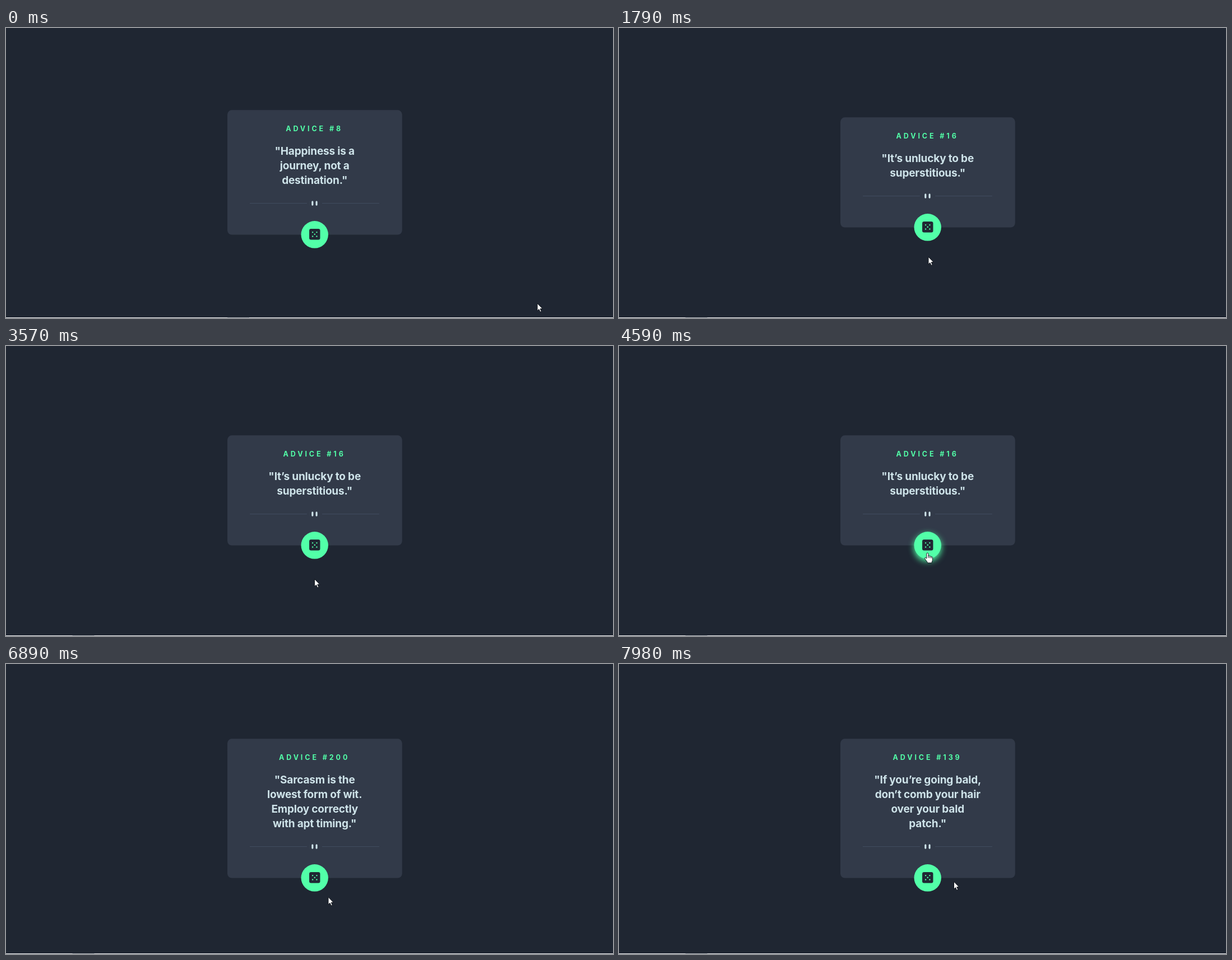
Animation of 1083x517 px, one loop 8 s. Source, as an HTML page:

```html
<!DOCTYPE html>
<html lang="en">
<head>
<meta charset="utf-8">
<title>Advice generator</title>
<style>
  html, body { margin: 0; width: 100%; height: 100%; overflow: hidden; background: #1f2632; }
  svg { display: block; width: 1083px; height: 517px; }
  text { font-family: Inter, "Open Sans", sans-serif; font-weight: 700; text-anchor: middle; }
  #title { font-size: 12.5px; letter-spacing: 3.9px; fill: #52ffa8; }
  #quote { font-size: 19px; letter-spacing: -.18px; fill: #cee3e9; }
  #button { fill: #52ffa8; }
  #button.hover { filter: drop-shadow(0 4px 6px #52ffa8); }
  #cursor { fill: #fff; stroke: #10141b; stroke-linejoin: round; }
</style>
</head>
<body>
<svg viewBox="0 0 1083 517">
  <rect id="card" x="395" width="311.7" rx="8" fill="#323a49"/>
  <text id="title" x="550.1"></text>
  <g id="quote"></g>
  <g id="footer">
    <g transform="translate(435 -60.16) scale(.52)">
      <path d="M0 8H196M248 8H444" stroke="#4f5d74"/>
      <g fill="#cee3e9">
        <rect x="212" width="6" height="16" rx="3"/>
        <rect x="226" width="6" height="16" rx="3"/>
      </g>
    </g>
    <circle id="button" cx="550.7" cy="-.2" r="24.2"/>
    <g id="dice" transform="translate(550.75 -.75) scale(.81)" fill="#52ffa8">
      <rect x="-12" y="-12" width="24" height="24" rx="4" fill="#202733"/>
    </g>
  </g>
  <rect y="516" width="1083" height="1" fill="#fff"/>
  <rect id="tab" y="516" width="39" height="1" fill="#c3c6cc"/>
  <circle id="click" r="10" fill="#ff0" fill-opacity=".52"/>
  <g id="cursor">
    <path id="arrow" d="M0 0V13.2L3 10.5 5.1 15.3 7.3 14.3 5.2 9.6H9.3Z"/>
    <g id="hand">
      <path d="M-1.7 10V1.6A1.6 1.6 0 0 1 1.5 1.6V6C1.5 4.6 4.2 4.6 4.2 6.3 4.2 5.3 6.7 5.4 6.7 7 6.7 6.2 8.9 6.3 8.9 8V12.3C8.9 14.5 7.4 15.2 7.4 17.7H0C0 15.6-2.4 14-3.7 11.8-4.6 10.4-5.6 9.7-5 8.8-4.2 7.6-2.5 9-1.7 10Z"/>
      <path d="M1.5 6V9M4.2 6.5V9.2M6.7 7V9.5" fill="none"/>
    </g>
  </g>
</svg>
<script>
const DURATION = 8000;
const CENTER = { x: 550.7, y: 257.4 };
const LINE_HEIGHT = 26;
const BUTTON_RADIUS = 24.2;
const CLICK_LENGTH = 70;

const advices = [
  { at: 0, id: 8, text: '"Happiness is a\njourney, not a\ndestination."' },
  { at: 1540, id: 16, text: '"It’s unlucky to be\nsuperstitious."' },
  { at: 5060, id: 200, text: '"Sarcasm is the\nlowest form of wit.\nEmploy correctly\nwith apt timing."' },
  { at: 7740, id: 139, text: '"If you’re going bald,\ndon’t comb your hair\nover your bald\npatch."' },
];

// The pointer goes on and off the button; each move starts where the last one ended.
const pointerStart = { x: 948, y: 491 };
const moves = [
  { at: 20, x: 565, y: 368 },
  { at: 1540, x: 552, y: 408 },
  { at: 2060, x: 550, y: 376 },
  { at: 2360, x: 550.5, y: 415.5 },
  { at: 3570, x: 550.5, y: 369 },
  { at: 6170, x: 575, y: 415.5 },
  { at: 6890, x: 555.5, y: 384 },
  { at: 7740, x: 597.5, y: 388 },
];
const clickTimes = [940, 4230, 5920];

const el = id => document.getElementById(id);
const set = (node, attrs) => {
  for (const name in attrs) node.setAttribute(name, attrs[name]);
  return node;
};
const make = (tag, parent, attrs) =>
  set(parent.appendChild(document.createElementNS('http://www.w3.org/2000/svg', tag)), attrs);
const show = (node, visible) => { node.style.display = visible ? '' : 'none'; };

const addPip = (cx, cy) => make('circle', el('dice'), { cx, cy, r: 1.5 });
addPip(0, 0);
for (const x of [-4.5, 4.5]) for (const y of [-4.5, 4.5]) addPip(x, y);

function pointerAt(time) {
  let { x, y } = pointerStart;
  for (const move of moves) {
    if (time < move.at) break;
    const dx = move.x - x, dy = move.y - y;
    const travelTime = 200 + .87 * Math.hypot(dx, dy);
    const u = Math.min(1, (time - move.at) / travelTime);
    const eased = u * u * (3 - 2 * u);
    x += dx * eased;
    y += dy * eased;
  }
  return { x, y };
}

let current;
function showAdvice(advice) {
  if (advice === current) return;
  current = advice;
  const lines = advice.text.split('\n');
  const height = 144.2 + LINE_HEIGHT * lines.length;
  const top = CENTER.y - height / 2;
  advice.bottom = top + height;
  set(el('card'), { y: top, height });
  set(el('title'), { y: top + 37.4 }).textContent = `ADVICE #${advice.id}`;
  set(el('footer'), { transform: `translate(0 ${advice.bottom})` });
  el('quote').replaceChildren();
  lines.forEach((line, i) => {
    make('text', el('quote'), { x: CENTER.x, y: top + 79.7 + i * LINE_HEIGHT }).textContent = line;
  });
}

function draw() {
  const time = performance.now() % DURATION;
  showAdvice(advices.findLast(advice => time >= advice.at));

  const { x, y } = pointerAt(time);
  const hover = Math.hypot(x - CENTER.x, y - current.bottom) < BUTTON_RADIUS;
  set(el('cursor'), { transform: `translate(${x} ${y})` });
  show(el('hand'), hover);
  show(el('arrow'), !hover);
  el('button').classList.toggle('hover', hover);

  set(el('click'), { cx: x, cy: y });
  show(el('click'), clickTimes.some(start => time >= start && time < start + CLICK_LENGTH));
  set(el('tab'), { x: time < clickTimes[0] ? 395 : 118.5 });
  requestAnimationFrame(draw);
}
draw();
</script>
</body>
</html>
```
